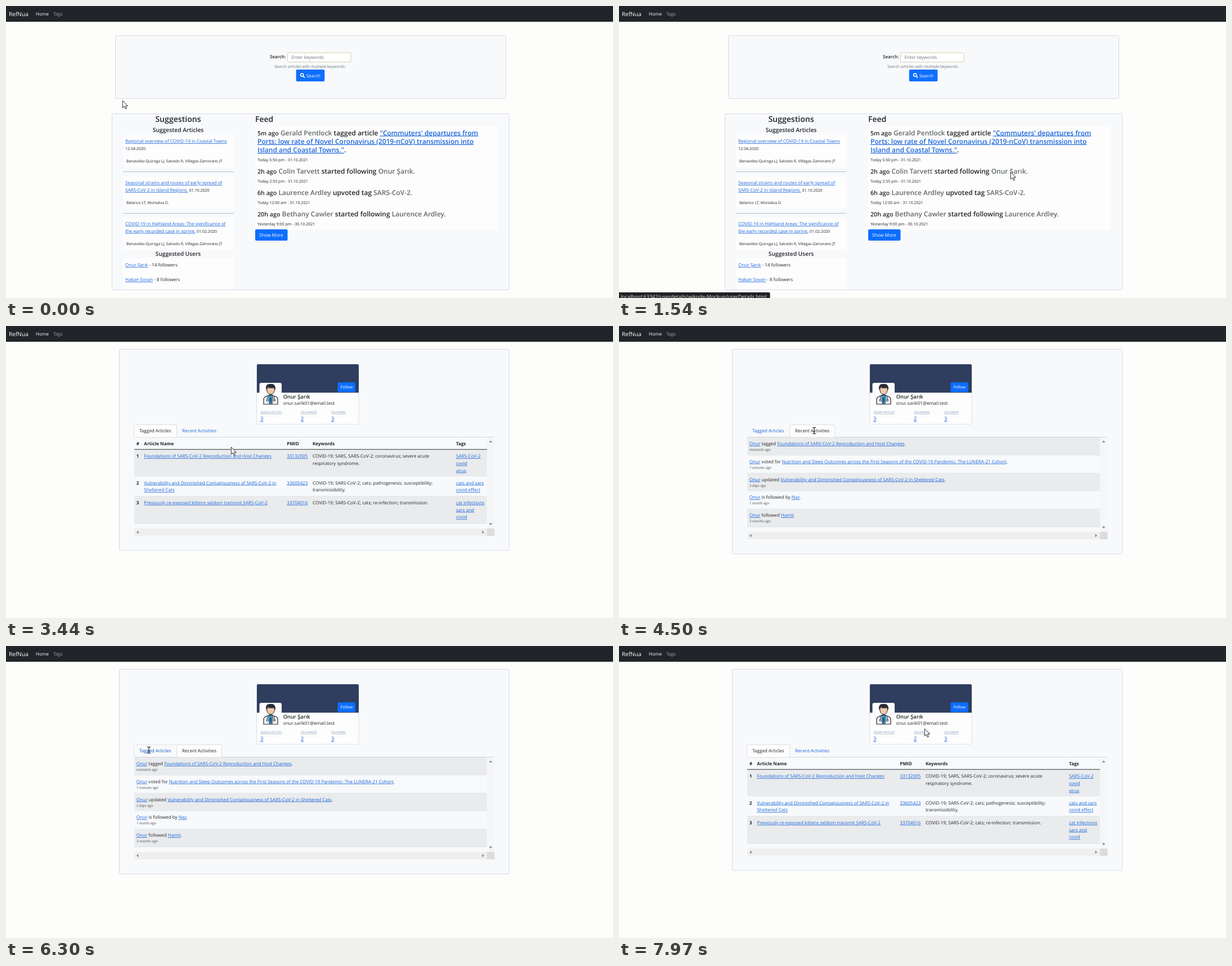
These frames come from a looping animation (1079x519 px, 8000 ms). An HTML page:

```html
<!DOCTYPE html>
<html lang="en">
<head>
<meta charset="utf-8">
<title>Article tagging demo</title>
<style>
  html, body { margin: 0; height: 100%; overflow: hidden; background: #fdfdfc; }
  svg { display: block; width: 100vw; height: 100vh; }
  text { font-family: "Open Sans", "Noto Sans", sans-serif; fill: #212529; text-rendering: geometricPrecision; white-space: pre; }
  .link { fill: #1a66dd; text-decoration: underline; }
  .muted { fill: #62686d; }
  .small { font-size: 7.05px; }
  .semi { font-weight: 600; }
  .bold { font-weight: 700; }
  .mid { text-anchor: middle; }
  .white { fill: #fff; }
  .grey { fill: #6c757d; }
  .note { fill: #555; font-style: italic; }
  .label { fill: #7d93b5; font-style: italic; text-decoration: underline; }
  .idle rect { fill: none; stroke: none; }
  .idle text { fill: #1a66dd; }
  .idle.hover rect { stroke: #dfe3e9; }
  .idle.hover text { fill: #0a58ca; }
</style>
</head>
<body>
<svg id="stage" viewBox="0 0 1079 519" preserveAspectRatio="none"></svg>
<script>
const BODY = 8.1, SMALL = 7.05, H3 = 14.1, H4 = 12, H5 = 10.3;
const BLUE = '#0d6efd', CARD = '#f8f9fb', PAPER = '#fdfdfd', EDGE = '#d6d9e3', STRIPE = '#eaebec';

// Inline markup: [link], {muted}, ~small~
const inline = s => s
  .replace(/\[(.+?)\]/g, '<tspan class="link">$1</tspan>')
  .replace(/\{(.+?)\}/g, '<tspan class="muted">$1</tspan>')
  .replace(/~(.+?)~/g, '<tspan class="small">$1</tspan>');
const text = (x, y, s, size = BODY, cls = '') =>
  `<text x="${x}" y="${y}" font-size="${size}" class="${cls}">${inline(s)}</text>`;
const box = (x, y, x2, y2, fill, stroke = 'none', r = 0) =>
  `<rect x="${x}" y="${y}" width="${x2 - x}" height="${y2 - y}" rx="${r}" fill="${fill}" stroke="${stroke}"/>`;
const shape = (d, fill, stroke = 'none', width = 1) =>
  `<path d="${d}" fill="${fill}" stroke="${stroke}" stroke-width="${width}"/>`;
const lines = (x, y, step, list) => list.map((s, i) => text(x, y + i * step, s)).join('');

const navbar = box(0, 0, 1079, 28, '#212529') +
  text(5, 17.6, 'RefNua', 10.1, 'white') + text(53, 16.8, 'Home', BODY, 'white') +
  '<g opacity=".58">' + text(84, 16.8, 'Tags', BODY, 'white') + '</g>';

function searchCard() {
  return box(194.5, 52.5, 888.5, 164.5, CARD, EDGE, 2) +
    text(469, 92.9, 'Search:', 8.05, 'semi') +
    box(500.5, 83, 613, 99.5, '#fff', '#d6d0b0', 2) +
    text(507.5, 94.4, 'Enter keywords', 8.05, 'grey') +
    text(477, 110.4, 'Search articles with multiple keywords.', SMALL, 'grey') +
    box(515.7, 113, 566.3, 134, BLUE, 'none', 2) +
    '<circle cx="526.2" cy="122.6" r="2.7" fill="none" stroke="#fff" stroke-width="1.5"/>' +
    shape('M528.2 124.6L531 127.4', 'none', '#fff', 1.8) +
    text(533.7, 126.8, 'Search', 8.05, 'white');
}

function suggestions() {
  const authors = 'Benavidez-Quiroga LJ, Salcedo R, Villegas-Zamorano JT';
  const panels = [[229, 287], [303, 360], [376, 434], [448, 504]];
  return text(306, 206, 'Suggestions', H3, 'semi mid') +
    text(306, 223.6, 'Suggested Articles', H5, 'semi mid') +
    panels.map(([a, b]) => box(208, a, 405, b, PAPER)).join('') +
    [294.5, 368.5].map(y => shape(`M208 ${y}H405`, 'none', '#b4bfce')).join('') +
    lines(212, 243, 12.8, ['[Regional overview of COVID-19 in Coastal Towns]', '~12.04.2020~']) +
    text(214, 278, authors, 6.8) +
    lines(212, 317, 12.9, ['[Seasonal strains and routes of early spread of]',
      '[SARS-CoV-2 in Island Regions.] ~01.10.2020~']) +
    text(214, 352.2, 'Belarico LT, Montalva D.', 6.8) +
    lines(212, 389.8, 12.9, ['[COVID-19 in Highland Areas: The significance of]',
      '[the early recorded case in spring.] ~01.02.2020~']) +
    text(214, 425.2, authors, 6.8) +
    text(306, 443.6, 'Suggested Users', 10.15, 'semi mid') +
    lines(212, 463, 26, ['[Onur Şarık] - 14 followers', '[Hakan Sovan] - 8 followers']);
}

function feed() {
  const entry = (y, ago, s, when, whenY) =>
    text(447, y, `<tspan font-size="10.7">${ago} ago</tspan> ${s}`, H4, 'semi') +
    text(447, whenY, when, SMALL);
  return text(443, 206, 'Feed', 13.9, 'semi') + box(443, 213, 874, 398, PAPER) +
    entry(229.5, '5m', `{Gerald Pentlock} tagged article ["Commuters' departures from]`, 'Today 5:50 pm - 31.10.2021', 276.4) +
    text(447, 244.8, '[Ports: low rate of Novel Coronavirus (2019-nCoV) transmission into]', H4, 'semi') +
    text(447, 260, '[Island and Coastal Towns."].', H4, 'semi') +
    entry(298.3, '2h', '{Colin Tarvett} started following {Onur Şarık.}', 'Today 2:55 pm - 31.10.2021', 314.2) +
    entry(336, '6h', '{Laurence Ardley} upvoted tag {SARS-CoV-2.}', 'Today 12:00 am - 31.10.2021', 352) +
    entry(373.8, '20h', '{Bethany Cawler} started following {Laurence Ardley.}', 'Yesterday 9:00 pm - 30.10.2021', 390.3) +
    box(443, 397, 500.5, 417, BLUE, 'none', 2) + text(450, 410, 'Show More', 8.15, 'white');
}

const statusBar = shape('M0 509H266Q268.5 509 268.5 511.5V519H0Z', '#202124') +
  '<g opacity=".85">' + text(3, 520.3, 'localhost:63342/userdetails/wikode-Mockup/userDetails.html', 9.1, 'white') + '</g>';

const avatar = box(450.5, 101, 490, 141, '#fdfdfe', 'none', 3) +
  shape('M458 139V131Q458 126 464 124.5L470.5 122L477 124.5Q483 126 483 131V139Z', '#f4f6f8', '#20242c', 1.2) +
  shape('M466.5 123.5H474.5L473 138H468Z', '#3aa3d8', '#20242c', .8) +
  shape('M470.5 126L472 128L471.5 136H469.5L469 128Z', '#1c4f86') +
  shape('M463.5 110Q463.5 121.5 470.5 121.5T477.5 110Z', '#f3c9ab', '#20242c', 1) +
  shape('M462.8 113Q460.8 103 469 103.5Q479.5 101.5 478.4 113L476.6 109Q469 110.5 465 108Z', '#2c2a33', '#20242c', .8) +
  shape('M464.5 125V130M476.8 125V130', 'none', '#20242c', 1.1) +
  '<circle cx="464.5" cy="132" r="1.6" fill="none" stroke="#20242c"/>' +
  '<circle cx="477" cy="132" r="1.6" fill="none" stroke="#20242c"/>';

function profile() {
  const stat = (x, label, n) =>
    text(x, 155, label, 4.9, 'label') + text(x, 168.4, `[${n}]`, 9.4);
  return box(445.5, 68, 627, 174.5, PAPER, '#dde1e8', 2) +
    shape('M446 118.5V70Q446 68 448 68H625Q627 68 627 70V118.5Z', '#2f3d5e') + avatar +
    box(589.5, 100, 621, 117.5, BLUE, 'none', 2) + text(605.3, 111.4, 'Follow', 7.3, 'white mid') +
    text(492.7, 129.2, 'Onur Şarık', 9.3, 'semi') +
    text(492.5, 140.3, 'onur.sarik01@email.test') +
    stat(452, 'TAGGED ARTICLES', 3) + stat(524, 'FOLLOWINGS', 2) + stat(578, 'FOLLOWERS', 3);
}

function tabs(active) {
  const items = [[227.5, 303.5, 237, 'Tagged Articles'], [303.5, 383.5, 313, 'Recent Activities']];
  return shape('M228 197.5H868', 'none', '#cfd4db') +
    items.map(([x, x2, tx, s], i) =>
      `<g class="${i === active ? 'tab' : 'idle'}">` +
      box(x, 175.5, x2, 198, '#fdfdfd', '#dcdfe5', 2) + text(tx, 189.2, s) + '</g>').join('');
}

// Scroll bars whose horizontal track starts at y
function scrollBars(y) {
  const arrows = `M858.5 207L861.5 203.5L864.5 207ZM858.5 ${y - 9.5}L861.5 ${y - 6}L864.5 ${y - 9.5}Z` +
    `M235.5 ${y + 3.5}L232 ${y + 6.5}L235.5 ${y + 9.5}ZM846.5 ${y + 3.5}L850 ${y + 6.5}L846.5 ${y + 9.5}Z`;
  return box(855, 198, 868.5, y, '#f5f6f7') + box(228, y, 855, y + 13, '#efefef') +
    box(855, y, 868.5, y + 13, '#dcdcdc') + shape(arrows, '#85888c');
}

const row = (y, y2, striped) =>
  box(228, y, 855, y2, striped ? STRIPE : CARD) + shape(`M228 ${y2}H855`, 'none', '#d9dce2', .8);

function articleTable() {
  const article = (y, n, title, pmid, words, tags) =>
    text(231.7, y, n, BODY, 'bold') + lines(245.3, y, 12.8, title.map(s => `[${s}]`)) +
    text(499.3, y, `[${pmid}]`) + lines(545, y, 12.8, words) +
    lines(800, y, 12.8, tags.map(s => `[${s}]`));
  const heads = [[231.7, '#'], [245.3, 'Article Name'], [499.3, 'PMID'], [545, 'Keywords'], [800, 'Tags']];
  return heads.map(([x, s]) => text(x, 211.9, s, BODY, 'bold')).join('') +
    row(219, 267, true) + row(267, 302.5, false) + row(302.5, 350.5, true) +
    shape('M228 219.3H855', 'none', '#33383d') +
    article(234, '1', ['Foundations of SARS-CoV-2 Reproduction and Host Changes'], '33132005',
      ['COVID-19; SARS, SARS-CoV-2; coronavirus; severe acute', 'respiratory syndrome.'],
      ['SARS-CoV-2', 'covid', 'virus']) +
    article(281.6, '2', ['Vulnerability and Diminished Contagiousness of SARS-CoV-2 in', 'Sheltered Cats'], '33605423',
      ['COVID-19; SARS-CoV-2; cats; pathogenesis; susceptibility;', 'transmissibility.'],
      ['cats and sars', 'covid effect']) +
    article(316.8, '3', ['Previously re-exposed kittens seldom transmit SARS-CoV-2'], '33704016',
      ['COVID-19; SARS-CoV-2; cats; re-infection; transmission.'],
      ['cat infections', 'sars and', 'covid']) +
    scrollBars(360);
}

function activityList() {
  const items = [
    ['tagged [Foundations of SARS-CoV-2 Reproduction and Host Changes].', 'moments ago'],
    ['voted for [Nutrition and Sleep Outcomes across the First Seasons of the COVID-19 Pandemic: The LUNERA-21 Cohort].', '7 minutes ago'],
    ['updated [Vulnerability and Diminished Contagiousness of SARS-CoV-2 in Sheltered Cats].', '3 days ago'],
    ['is followed by [Naz].', '1 month ago'],
    ['followed [Hamit].', '3 months ago']];
  return items.map(([s, when], i) => {
    const y = 198 + i * 31.8;
    return row(y, y + 31.8, i % 2 === 0) + text(231.7, y + 13.9, '[Onur] ' + s) +
      text(231.7, y + 24, when, 6.3, 'note');
  }).join('') + scrollBars(366);
}

const userPage = (bottom, active, content) =>
  box(201.5, 41.5, 894.5, bottom, CARD, EDGE, 2) + profile() + content + tabs(active);

const group = (id, content) => `<g id="${id}">${content}</g>`;
const stage = document.getElementById('stage');
stage.innerHTML = box(0, 0, 1079, 519, '#fdfdfc') + navbar +
  group('home', searchCard() + box(188.5, 191.5, 894.5, 504.5, CARD, EDGE, 2) + suggestions() + feed()) +
  group('status', statusBar) +
  group('articles', userPage(399, 0, articleTable())) +
  group('activities', userPage(405.3, 1, activityList())) +
  group('arrow', shape('M.3 0V13L3.3 10.3L5.3 15L7.3 14.1L5.4 9.6H9.3Z', '#fff', '#16181b', .9)) +
  group('beam', shape('M-3 -5.5H-1L0 -4.7L1 -5.5H3M-3 5.5H-1L0 4.7L1 5.5H3M0 -4.7V4.7M-1.5 1.8H1.5', 'none', '#16181b', 1.1));

// Pointer stops: time, x, y
const stops = [
  [0, 207, 168], [70, 207, 168], [1440, 696, 295], [2240, 696, 295], [2540, 615, 337],
  [2700, 615, 337], [3440, 400, 215], [3600, 400, 215], [3870, 347, 186], [4840, 347, 186],
  [5300, 385, 250], [5700, 340, 232], [6200, 254, 185], [7400, 254, 185], [7960, 543, 147], [8000, 543, 147]];
const ENTER_LINK = 1400, OPEN_USER = 1900, OPEN_ACTIVITIES = 4100, OPEN_ARTICLES = 6800, LOOP = 8000;

function pointerAt(t) {
  const i = stops.findIndex(s => s[0] > t);
  const [t0, x0, y0] = stops[i - 1], [t1, x1, y1] = stops[i];
  const p = (t - t0) / (t1 - t0), e = p * p * (3 - 2 * p);
  return [x0 + (x1 - x0) * e, y0 + (y1 - y0) * e];
}

const el = id => document.getElementById(id);
const show = (id, on) => el(id).style.display = on ? '' : 'none';

function draw() {
  const t = performance.now() % LOOP;
  const [x, y] = pointerAt(t);
  const onHome = t < OPEN_USER, onActivities = t >= OPEN_ACTIVITIES && t < OPEN_ARTICLES;
  const inTabs = !onHome && y > 176 && y < 198;
  const overArticles = inTabs && x > 228 && x < 303, overActivities = inTabs && x > 304 && x < 383;
  const beam = overArticles || overActivities;
  show('home', onHome);
  show('status', onHome && t >= ENTER_LINK);
  show('articles', !onHome && !onActivities);
  show('activities', onActivities);
  document.querySelector('#articles .idle').classList.toggle('hover', overActivities);
  document.querySelector('#activities .idle').classList.toggle('hover', overArticles);
  show('beam', beam);
  show('arrow', !beam);
  el(beam ? 'beam' : 'arrow').setAttribute('transform', `translate(${x} ${y})`);
  requestAnimationFrame(draw);
}
draw();
</script>
</body>
</html>
```
